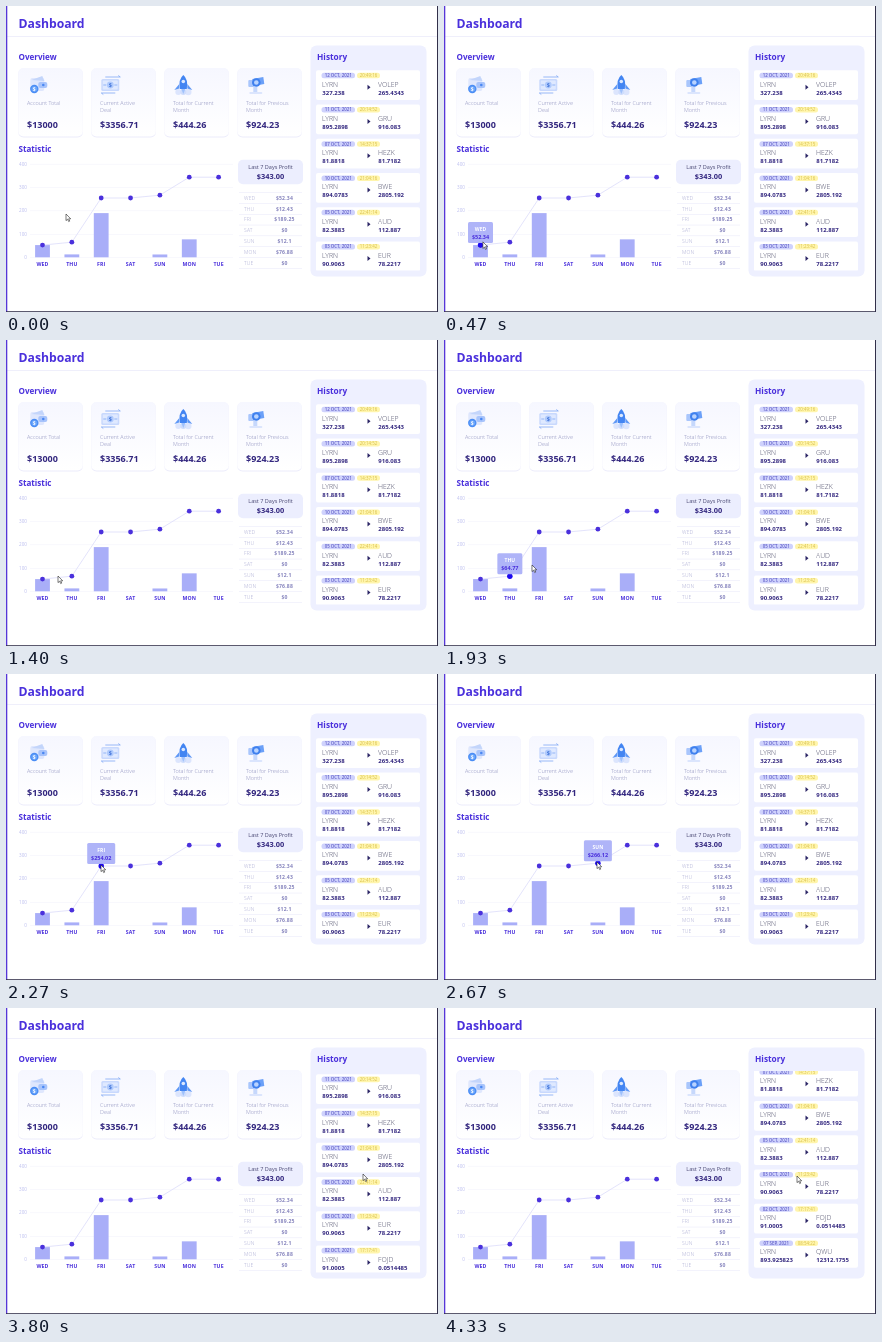
An HTML page for the animation above (5.14 s loop, 432x306 px).

```html
<!DOCTYPE html>
<html lang="en">
<head>
<meta charset="utf-8">
<title>Dashboard</title>
<style>
  html, body { margin: 0; width: 100%; height: 100%; overflow: hidden; background: #fff; }
  svg { display: block; width: 432px; height: 306px; font-family: "Open Sans", "Noto Sans", sans-serif; }
</style>
</head>
<body>
<svg id="stage" viewBox="0 0 432 306" xmlns="http://www.w3.org/2000/svg"></svg>
<script>
const LOOP = 5140, STEP = 1000 / 15;
const INDIGO = '#4a30dc', NAVY = '#33277f', BAR = '#a9aef8';

const text = (x, y, size, fill, str, weight = 400, extra = '') =>
  `<text x="${x}" y="${y}" font-size="${size}" fill="${fill}" font-weight="${weight}" ${extra}>${str}</text>`;
const mid = 'text-anchor="middle"';
const rect = (x, y, w, h, fill, r = 0, extra = '') =>
  `<rect x="${x}" y="${y}" width="${w}" height="${h}" rx="${r}" fill="${fill}" ${extra}/>`;
const circle = (x, y, r, fill) => `<circle cx="${x}" cy="${y}" r="${r}" fill="${fill}"/>`;
const path = (d, fill, extra = '') => `<path d="${d}" fill="${fill}" ${extra}/>`;

// Overview cards
const icons = [
  rect(3, 3, 14, 13, '#dfe7fd', 2) + path('M4 5L15 1L17 6Z', '#c3d5fb') + rect(11, 7, 9, 6, '#a8c4fb', 2) +
    circle(16, 10, 1.3, '#4b88f3') + circle(7, 14, 4.2, '#4a8df5') + circle(7, 14, 2.8, '#6ca6fa') +
    text(7, 16, 5, '#fff', '$', 700, mid),
  rect(1, 4, 18, 12, '#c9d9fd', 1.5) + rect(2.5, 5.5, 15, 9, '#dfe9ff', 1) + circle(10, 10, 3.4, '#b0cafc') +
    text(10, 12, 5.5, '#3d71d8', '$', 700, mid) +
    path('M3 10H6M14 10H17M5 2H20L18 0.5M15 18H1L3 19.5', 'none', 'stroke="#7ea8f5" stroke-width="0.8"'),
  circle(5, 17, 3, '#dce5fd') + circle(15, 17, 3.2, '#dce5fd') + circle(10, 17, 3, '#cfddfc') +
    path('M6 9L1 15L6 13.5ZM14 9L19 15L14 13.5Z', '#5f98f6') +
    path('M10 0Q15 4 13.5 14H6.5Q5 4 10 0Z', '#4385f2') + circle(10, 6.5, 1.8, '#dbe8ff') +
    path('M8 14H12L10 19Z', '#9fc1fc'),
  rect(2, 5, 6, 7, '#a9c6fc', 1) + rect(7, 12, 4, 7, '#c6d8fc') + rect(3, 17, 13, 2, '#dbe5fd', 1) +
    path('M6 4L17 2L18 9L7 11Z', '#6ba0f8') + circle(10, 7.5, 4.3, '#3f80ee') + circle(10, 7.5, 2.3, '#b9d3ff')
];
const cards = [
  ['$13000', 'Account Total'],
  ['$3356.71', 'Current Active', 'Deal'],
  ['$444.26', 'Total for Current', 'Month'],
  ['$924.23', 'Total for Previous', 'Month']
].map(([value, ...lines], i) => {
  const x = 12.3 + 73 * i;
  return rect(x, 62.5, 64.5, 69, '#ececfb', 5) + rect(x, 62, 64.5, 68.5, 'url(#card)', 5) +
    `<g transform="translate(${x + 9} 69)">${icons[i]}</g>` +
    lines.map((s, n) => text(x + 8.7, 98.8 + 7.2 * n, 5.5, '#8587b8', s, 300)).join('') +
    text(x + 8.7, 122, 9, NAVY, value, 700);
}).join('');

// Statistic chart: bars are daily profit, dots the running total
const days = ['WED', 'THU', 'FRI', 'SAT', 'SUN', 'MON', 'TUE'];
const profit = [52.34, 12.43, 189.25, 0, 12.1, 76.88, 0];
const level = v => 251.3 - v * 0.2335;
let sum = 0;
const points = profit.map((v, i) => ({ x: 36.5 + 29.35 * i, y: level(sum += v), total: sum }));

let chart = '';
for (let v = 0; v <= 400; v += 100) {
  chart += text(21, level(v) + 1.6, 4.6, '#b9bbee', v, 400, 'text-anchor="end"') +
    rect(24, level(v), 203, 0.5, '#f0f0fb');
}
points.forEach((p, i) => {
  chart += rect(p.x - 7.4, level(profit[i]), 14.8, profit[i] * 0.2335, BAR) +
    text(p.x, 260, 5.2, INDIGO, days[i], 700, mid + ' letter-spacing=".15"');
});
chart += path('M' + points.map(p => p.x + ' ' + p.y).join('L'), 'none', 'stroke="#dcdcfa" stroke-width=".8"') +
  points.map(p => circle(p.x, p.y, 2.4, INDIGO)).join('');

const table = days.map((day, i) => {
  const y = 193.7 + 10.8 * i;
  return text(238, y, 5, '#a3a4cf', day, 300, 'letter-spacing=".2"') +
    text(278.5, y, 5.1, '#8583bd', '$' + profit[i], 700, mid + ' letter-spacing=".2"') +
    rect(233, y - 7.3, 63, 0.5, '#e6e6f8');
}).join('') + rect(233, 262.2, 63, 0.5, '#e6e6f8');

// History list
const trades = [
  ['12 OCT', '20:49:16', 'VOLEP', '327.238', '265.4343'],
  ['11 OCT', '20:14:52', 'GRU', '895.2898', '916.083'],
  ['07 OCT', '14:37:15', 'HEZK', '81.8818', '81.7182'],
  ['10 OCT', '21:04:16', 'BWE', '894.0783', '2805.192'],
  ['05 OCT', '22:41:14', 'AUD', '82.3883', '112.887'],
  ['03 OCT', '11:23:42', 'EUR', '90.9063', '78.2217'],
  ['02 OCT', '17:17:41', 'FOJD', '91.0005', '0.0514485'],
  ['07 SEP', '08:54:22', 'QWU', '893.925823', '12312.1755']
].map(([date, time, coin, paid, got], i) =>
  `<g transform="translate(310 ${64.3 + 34.25 * i})">` +
  rect(0, 0, 104, 29.8, '#fff', 2) +
  rect(5.5, 2.4, 33.5, 5.6, '#cfd2fc', 2.5) + text(22.2, 6.9, 4.4, '#6260c8', date + ', 2021', 600, mid) +
  rect(41, 2.4, 23, 5.6, '#fff5ac', 2.5) + text(52.5, 6.9, 4.4, '#d6bd48', time, 400, mid) +
  text(6, 16.3, 6.9, '#4c4c68', 'LYRN', 300) + text(62, 16.3, 6.9, '#4c4c68', coin, 300) +
  text(6.3, 24.3, 6, NAVY, paid, 700) + text(62.3, 24.3, 6, NAVY, got, 700) +
  path('M51.5 14.5L54.5 17L51.5 19.5Z', '#2c2666') + '</g>').join('');

const stage = document.getElementById('stage');
stage.innerHTML = `<defs>
    <linearGradient id="card" x2="0" y2="1"><stop stop-color="#f6f7ff"/><stop offset="1" stop-color="#fff"/></linearGradient>
    <clipPath id="view"><rect x="310" y="63" width="104" height="201.5"/></clipPath>
  </defs>` +
  rect(0, 0, 432, 306, '#fff') +
  text(12.5, 22.2, 12.2, INDIGO, 'Dashboard', 700) + rect(1, 30, 430, 0.7, '#e8e8fa') +
  text(12.5, 54, 8.1, INDIGO, 'Overview', 700) + cards +
  text(12.5, 145.8, 8.1, INDIGO, 'Statistic', 700) + chart +
  rect(232, 153.8, 65, 24.5, '#eceefe', 5) +
  text(264.5, 163, 5.5, '#44436f', 'Last 7 Days Profit', 400, mid) +
  text(264.5, 173, 7.4, NAVY, '$343.00', 700, mid) + table +
  rect(304.5, 39.5, 116, 231, '#eef0ff', 6) + text(311, 54, 8.3, INDIGO, 'History', 700) +
  `<g clip-path="url(#view)"><g id="list">${trades}</g></g>
  <g id="tip">${circle(0, 0, 2.7, '#1c08f0')}${rect(-13, -23, 26, 21, BAR, 1.5, 'id="box" opacity=".93"')}
    ${text(0, -14.4, 5, '#fff', '', 700, mid + ' id="day"')}${text(0, -6, 5.5, INDIGO, '', 700, mid + ' id="total"')}</g>` +
  rect(0, 0, 1.3, 306, '#5636d8') + rect(431, 0, 1, 306, '#32304a') + rect(0, 305.2, 432, 0.8, '#32304a') +
  path('M0 0V6.6L1.6 5.2L2.7 7.6L3.7 7.1L2.7 4.8H4.7Z', '#fff', 'id="cursor" stroke="#222" stroke-width=".6"');

const [list, tip, box, day, total, cursor] =
  ['list', 'tip', 'box', 'day', 'total', 'cursor'].map(id => document.getElementById(id));

// [time, x, y] of the pointer
const route = [
  [0, 60, 208], [530, 38, 237], [1200, 38, 237], [1600, 66, 235], [1730, 66, 235], [1930, 88, 225],
  [2130, 95, 191], [2270, 95, 191], [2470, 124, 191], [2600, 153, 188], [2730, 153, 188],
  [2930, 212, 171], [3170, 212, 171], [3470, 352, 165], [3670, 357, 166], [3930, 357, 166], [4330, 353, 168]
];
// [from, to] of the hover on each day
const hovers = [[460, 1330], [1460, 1990], [2060, 2320], [2390, 2520], [2520, 2760], [2790, 2860], [2860, 3250]];

const ease = (t, a, b) => {
  const u = Math.min(1, Math.max(0, (t - a) / (b - a)));
  return u * u * (3 - 2 * u);
};
const move = (el, x, y) => el.setAttribute('transform', `translate(${x} ${y})`);

function draw(t) {
  let [, x, y] = route[0];
  for (let i = 1; i < route.length; i++) {
    const [start, x0, y0] = route[i - 1], [end, x1, y1] = route[i], k = ease(t, start, end);
    x += (x1 - x0) * k;
    y += (y1 - y0) * k;
  }
  move(cursor, x, y);
  move(list, 0, -74 * ease(t, 3690, 3930));

  const i = hovers.findIndex(([from, to]) => t >= from && t < to);
  tip.style.display = i < 0 ? 'none' : '';
  if (i >= 0) {
    const p = points[i], w = p.total < 100 ? 25 : 28;
    move(tip, p.x, p.y);
    box.setAttribute('x', -w / 2);
    box.setAttribute('width', w);
    day.textContent = days[i];
    total.textContent = '$' + p.total.toFixed(2);
  }
}

const begin = performance.now();
function tick() {
  const t = (performance.now() - begin) % LOOP;
  draw(Math.floor((t + 4) / STEP) * STEP);
  requestAnimationFrame(tick);
}
tick();
</script>
</body>
</html>
```
